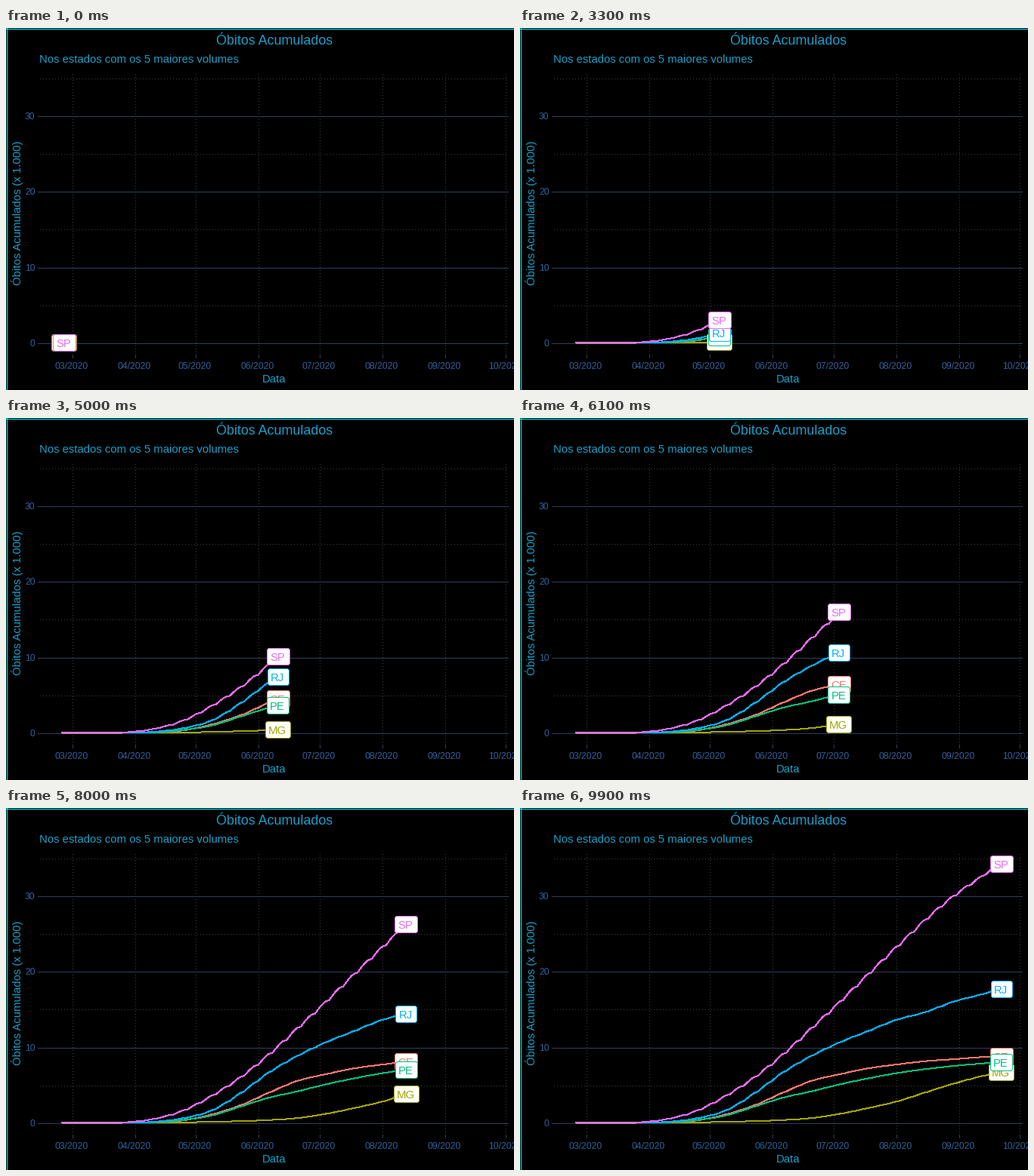
Write a matplotlib script that moves like this. It is 672 by 480 pixels and loops after 10000 ms.

```python
import numpy as np
import matplotlib.pyplot as plt
from matplotlib.animation import FuncAnimation
from matplotlib.patches import FancyBboxPatch

W, H, DPI = 672, 480, 100
FRAMES, INTERVAL = 100, 100
PX = 72 / DPI  # one pixel in points

TITLE, TICK, GRID, DOTS = "#1a9fc9", "#31619c", "#2f3f58", "#404040"
X0, DAY = 73.65, 2.68       # pixel of day 0, pixels per day
Y0, THOUSAND = 417.4, 10.033

plt.rcParams["font.family"] = "Liberation Sans"

# Cumulative deaths (thousands) every second Saturday, from day 18 on
ANCHORS = np.arange(18, 215, 14)
# name: (colour, label width, weekday effect, values)
STATES = {
    "CE": ("#F8766D", 30, 0.4,
           [0, .005, .067, .327, 1.114, 2.308, 3.966, 5.523, 6.411, 7.185,
            7.698, 8.129, 8.4, 8.68, 8.92]),
    "MG": ("#A3A500", 33, 0.5,
           [0, 0, .017, .058, .118, .219, .353, .629, 1.174, 1.939,
            2.8, 3.98, 5.15, 6.15, 7.0]),
    "PE": ("#00BF7D", 29, 0.4,
           [0, .005, .072, .381, .972, 2.144, 3.305, 4.148, 5.068, 5.86,
            6.55, 7.08, 7.5, 7.83, 8.1]),
    "RJ": ("#00B0F6", 28, 0.6,
           [0, .013, .155, .615, 1.653, 3.905, 6.639, 8.824, 10.624, 12.114,
            13.604, 14.6, 15.99, 16.97, 18.05]),
    "SP": ("#E76BF3", 30, 1.0,
           [0, .084, .56, 1.667, 3.608, 6.045, 9.058, 12.494, 15.996, 19.647,
            23.236, 26.78, 29.944, 32.567, 35.125]),
}
# Share of the weekly reports, Sunday to Saturday
WEEK = np.array([.45, .3, 1.45, 1.4, 1.3, 1.15, .95])
DAYS = np.arange(212)


def smooth(t, xs, ys):
    """Cubic Hermite curve through the points."""
    ys = np.asarray(ys)
    slope = np.gradient(ys, xs)
    slope[0] = 0
    t = np.clip(t, xs[0], xs[-1])
    i = np.clip(np.searchsorted(xs, t, side="right") - 1, 0, len(xs) - 2)
    h = xs[i + 1] - xs[i]
    u = (t - xs[i]) / h
    return (ys[i] * (1 + 2 * u) * (1 - u) ** 2 + ys[i + 1] * u * u * (3 - 2 * u)
            + h * u * (1 - u) * (slope[i] * (1 - u) - slope[i + 1] * u))


def daily(values, effect):
    weights = 1 + effect * (WEEK - 1)
    cum = np.concatenate([[0], np.cumsum(weights)])
    week, weekday = np.divmod(DAYS - 4, 7)
    return np.maximum(smooth(4 + 7 * week + cum[weekday], ANCHORS, values), 0)


def px_x(day):
    return X0 + DAY * day


def px_y(value):
    return Y0 - THOUSAND * value


fig = plt.figure(figsize=(W / DPI, H / DPI), dpi=DPI, facecolor="black")
ax = fig.add_axes([0, 0, 1, 1])
ax.set_xlim(0, W)
ax.set_ylim(H, 0)
ax.axis("off")


def line(xs, ys, color, z=1, **kw):
    return ax.plot(xs, ys, color=color, lw=PX, antialiased=False, zorder=z,
                   solid_capstyle="butt", dash_capstyle="butt", **kw)[0]


def label(x, y, s, size, color, ha="center", **kw):
    return ax.text(x, y, s, fontsize=size * PX, color=color, ha=ha,
                   va="baseline", **kw)


# Grid, axes and titles
DOTTED = (0, (1, 3))
for v in (5, 15, 25, 35):
    y = np.floor(px_y(v)) + .5
    line([45, 664], [y, y], DOTS, linestyle=DOTTED)
for month, day in zip(range(3, 11), (5, 36, 66, 97, 127, 158, 189, 219)):
    x = np.floor(px_x(day)) + .5
    line([x, x], [433, 57], DOTS, linestyle=DOTTED)
    line([x, x], [433, 437], GRID)
    label(x - .5, 452.3, f"{month:02d}/2020", 12.3, TICK)
for v in (0, 10, 20, 30):
    y = np.floor(px_y(v)) + .5
    line([42, 664], [y, y], GRID, 2)
    label(38.7, y + 4.8, str(v), 12.3, TICK, "right")

line([0, W], [.5, .5], "#00ffff")
line([.5, .5], [0, H], "#00ffff")
label(355, 22, "Óbitos Acumulados", 17.9, TITLE)
label(44.3, 46, "Nos estados com os 5 maiores volumes", 14.9, TITLE, "left")
label(354.5, 470, "Data", 14.9, TITLE)
label(19.8, 245.5, "Óbitos Acumulados (x 1.000)", 14.9, TITLE,
      rotation=90, rotation_mode="anchor")


class State:
    def __init__(self, name, z):
        color, self.width, effect, values = STATES[name]
        self.values = daily(values, effect)
        self.line = line([], [], color, 3 + z / 10)
        self.box = FancyBboxPatch(
            (0, 0), self.width, 22, boxstyle="round,pad=0,rounding_size=2.9",
            fc="white", ec=color, lw=PX, zorder=10 + z)
        ax.add_patch(self.box)
        self.text = label(0, 0, name, 14.9, color, zorder=10.5 + z)

    def show(self, day):
        days = np.append(DAYS[DAYS < day], day)
        ys = px_y(np.interp(days, DAYS, self.values))
        self.line.set_data(px_x(days), ys)
        x, y = px_x(day), np.round(ys[-1])
        self.box.set_x(np.round(x - self.width / 2) + .5)
        self.box.set_y(y - 10.5)
        self.text.set_position((x - .5, y + 6.3))


states = [State(name, z) for z, name in enumerate(STATES)]
# All five curves share the zero level at first
shared = line([], [], "#b39a9f", 4)


def draw(i):
    x = 77 + 5.652 * i
    day = (x - X0) / DAY
    for s in states:
        s.show(day)
    shared.set_data([X0, min(x, 153)], [417.5, 417.5])
    return []


anim = FuncAnimation(fig, draw, frames=FRAMES, interval=INTERVAL,
                     init_func=lambda: draw(0), repeat=True, repeat_delay=0)
plt.show()
```
